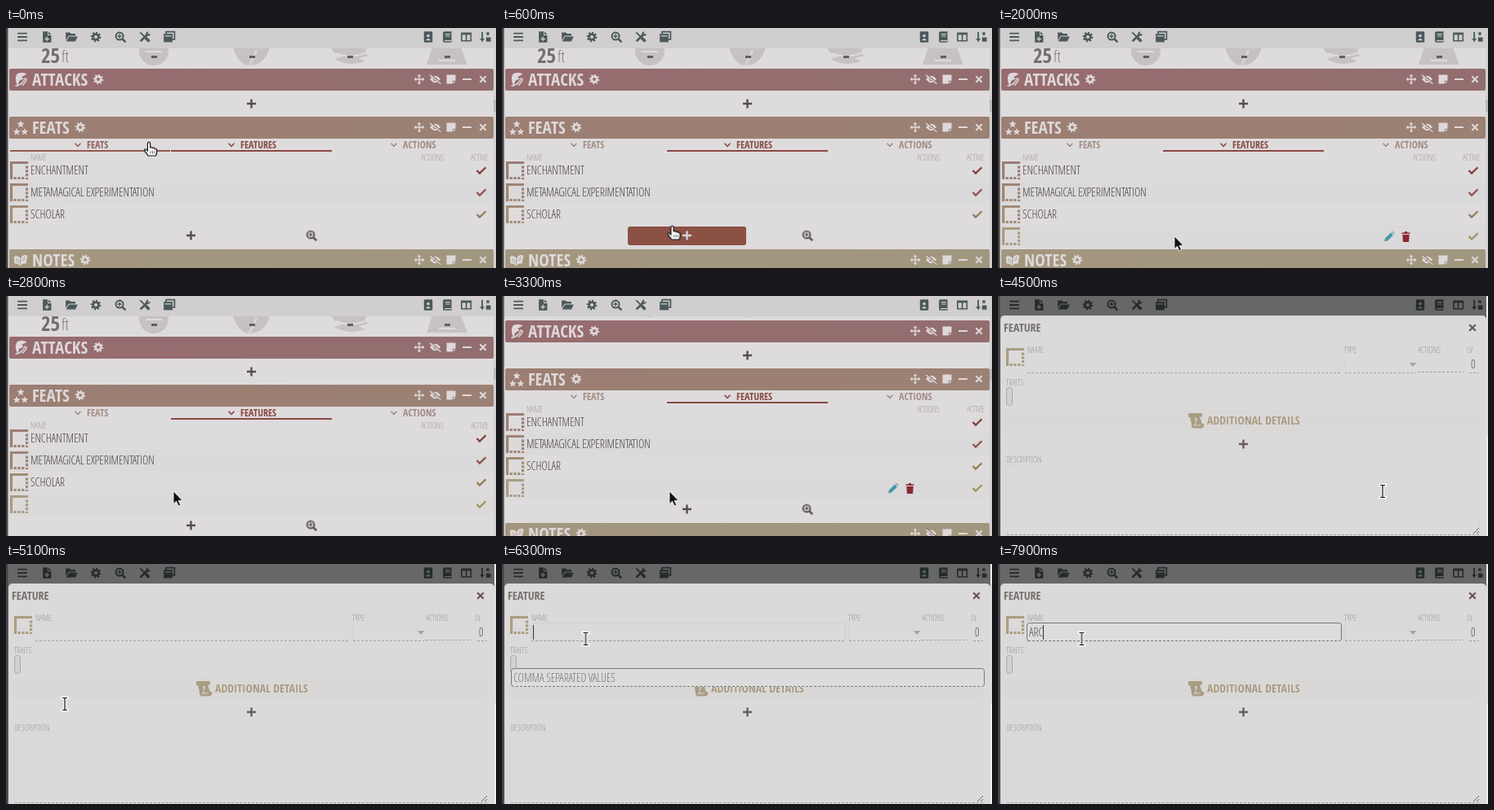
Write an HTML page that moves like this. It is 600x295 px and loops after 8000 ms.

```html
<!DOCTYPE html>
<html lang="en">
<head>
<meta charset="utf-8">
<title>Character sheet</title>
<style>
html, body { margin: 0; width: 100%; height: 100%; overflow: hidden; background: #dedbdd; }
svg { display: block; width: 600px; height: 295px; }
text { font-family: 'Open Sans Condensed Light', 'Open Sans', sans-serif; font-weight: 300; white-space: pre; }
text.b { font-family: 'Open Sans Condensed', 'Open Sans', sans-serif; font-stretch: condensed; font-weight: 700; }
text.wide { font-family: 'Open Sans', sans-serif; font-stretch: normal; }
.line { fill: none; stroke: currentColor; }
.dash { stroke: #a3a0a1; stroke-dasharray: 3 2; }
</style>
</head>
<body>
<svg id="stage" viewBox="0 0 600 295" xmlns="http://www.w3.org/2000/svg"></svg>
<script>
const LOOP = 8000;
const stage = document.getElementById('stage');

// Use a condensed face where there is one, otherwise narrow the regular one.
function narrowing(bold) {
  const width = cls => {
    stage.innerHTML = `<text class="${cls}" font-size="40">ADDITIONAL FEATURES</text>`;
    return stage.firstChild.getComputedTextLength();
  };
  return width(bold) / width(bold + ' wide') < 0.86 ? 1 : 0.71;
}
const narrow = { '': narrowing(''), b: narrowing('b') };

const text = (x, y, str, size, color, cls = '', id = '') =>
  `<g id="${id}"><text class="${cls}" transform="translate(${x} ${y}) scale(${narrow[cls]} 1)" font-size="${size}" fill="${color}">${str}</text></g>`;
const rect = (x, y, w, h, fill, r = 0, more = '') =>
  `<rect x="${x}" y="${y}" width="${w}" height="${h}" rx="${r}" fill="${fill}" ${more}/>`;
const path = (d, width = 0) => width
  ? `<path class="line" stroke-width="${width}" d="${d}"/>`
  : `<path fill="currentColor" d="${d}"/>`;
const group = (id, body) => `<g id="${id}">${body}</g>`;
const icon = (name, x, y, color, scale = 1) =>
  `<g transform="translate(${x} ${y}) scale(${scale})" color="${color}">${icons[name]}</g>`;

function star(cx, cy, r) {
  let d = '';
  for (let i = 0; i < 10; i++) {
    const a = i * Math.PI / 5 - Math.PI / 2, q = i % 2 ? r * 0.45 : r;
    d += `${i ? 'L' : 'M'}${(cx + q * Math.cos(a)).toFixed(2)} ${(cy + q * Math.sin(a)).toFixed(2)}`;
  }
  return path(d + 'z');
}

const INK = '#574b4e', PALE = '#ded8da', PANEL = '#dbdadb';

const icons = {
  bars: path('M-6-4.5H6M-6 0H6M-6 4.5H6', 1.8),
  file: path('M-5-7H1V-2H5.5V7H-5zM2-7L5.5-3H2z') + '<path d="M-2.5 2.5H3M.2-.2V5.2" stroke="#d0cece" stroke-width="1.4"/>',
  folder: path('M-7 4V-5.5H-2L-.5-4H5V-1.5H-3.5z M-3-.5H8L5 5.5H-6.5z'),
  cog: '<circle class="line" r="3.5" stroke-width="2.8"/><circle class="line" r="5.5" stroke-width="2" pathLength="16" stroke-dasharray="1 1"/>',
  zoom: '<circle class="line" cx="-1" cy="-1" r="4.6" stroke-width="2"/>' + path('M2.5 2.5L6.5 6.5', 2.6) + path('M-3.5-1H1.5M-1-3.5V1.5', 1.4),
  tools: path('M-5-5L1 1', 1.8) + path('M1 1L5.5 5.500', 3.6) + path('M-5.500 5.500L2.500-2.500', 2.8) + path('M6.500-3.500L3.500-2.200 2.200-3.500 3.500-6.500', 2) + path('M-7-6.500L-3.500-5-5-3.500z'),
  windows: path('M-4-4V-6.5H6.5V3H4', 1.8) + path('M-7-4H4V6.5H-7z') + '<path d="M-5.5-1.2H2.5" stroke="#d0cece" stroke-width="1.2"/>',
  contact: path('M-4-7H4Q5.500-7 5.500-5.500V5.500Q5.500 7 4 7H-4Q-5.500 7-5.500 5.500V-5.500Q-5.500-7-4-7z') + '<circle cy="-1.500" r="1.900" fill="#d0cece"/><path d="M-3.200 4.500Q0-.5 3.200 4.500z" fill="#d0cece"/>',
  book: path('M-3.5-7H5.5V7H-3.5Q-5.5 7-5.5 5V-5Q-5.5-7-3.5-7z') + '<path d="M-2.5-3.5H3.5M-2.5-1H3.5M-3.5 4.8H5" stroke="#d0cece" stroke-width="1.2"/>',
  columns: path('M-6-5H6V5H-6zM0-5V5', 1.7) + path('M-6-4H6', 2.4),
  sort: path('M-4-6.500V3', 2) + path('M-7 2H-1L-4 6.500zM1.500-6H5V-2.500H1.500zM1 .5H7V6H1z'),
  move: path('M-5.5 0H5.5M0-5.5V5.5', 1.5) + path('M0-7L2.6-4H-2.6zM0 7L2.6 4H-2.6zM-7 0L-4-2.6V2.6zM7 0L4-2.6V2.6z'),
  hidden: path('M-7 0Q0-9 7 0Q0 9-7 0z') + '<circle r="2.4" fill="#8d7370"/><path d="M-7-6.3L7 5.3" stroke="#8d7370" stroke-width="3"/>' + path('M-7-5.5L7.5 6', 1.6),
  note: path('M-6-6H6V2H2V6H-6zM3 3H6L3 6z'),
  minus: path('M-6 0H6', 2.2),
  close: path('M-4-4L4 4M4-4L-4 4', 2.3),
  plus: path('M-5.5 0H5.5M0-5.5V5.5', 2.4),
  check: path('M-5.5 0L-2 3.6 5.5-3.8', 2.3),
  chevron: path('M-3.5-1.7L0 1.8 3.5-1.7', 1.6),
  pencil: path('M-6 6L-5 2 2-5 5-2-2 5zM3-6L4-6.5 6.5-4 6-3z'),
  trash: path('M-5-5H-2L-1-6.5H1L2-5H5V-3.4H-5zM-4.2-2.5H4.2L3.6 6.5H-3.6z'),
  frame: path('M-9.5 11V-9.5H11', 3.2) + '<path class="line" stroke-width="3.2" stroke-dasharray="3.2 1.6" d="M9.5-5.500V11M6.300 9.500H-9"/>',
  attacks: path('M-5-8Q1-12 8-8L1-4 4-2-2 1-4 8Q-9-1-5-8z') + path('M-7 8Q3 6 6-3M2 7Q7 3 8-2', 1.6),
  feats: star(0, -5, 5.3) + star(-5.2, 5, 5) + star(5.2, 5, 5),
  notes: path('M-9-5Q-4-8 0-3Q3-9 9-7L7 4Q2 3-1 7Q-4 3-8 4z') + '<path d="M0-3L-1 6M-6-3L-2 0M-6 0L-2 3M3-3L6-5M2 0L6-2" stroke="#a3977f" stroke-width="1"/>',
  scroll: path('M-10-9H5Q8-9 7-5L4-4 7 4H9Q10 9 6 9.500H-3Q-7 9-6 4L-8-4H-10z') + `<text class="b" x="-3" y="4.500" font-size="11" fill="${PANEL}">?</text><path d="M-4 6H5" stroke="${PANEL}"/>`,
};

function bar(y, title, color, end, name) {
  const gear = { attacks: 113, feats: 91, notes: 97 }[name];
  const tools = ['move', 'hidden', 'note', 'minus', 'close'];
  return `<linearGradient id="g-${name}"><stop stop-color="${color}"/><stop offset="1" stop-color="${end}"/></linearGradient>` +
    rect(4, y, 593, 27, `url(#g-${name})`, 2) +
    icon(name, 18, y + 14, PALE, 0.93) + text(32, y + 21, title, 21, PALE, 'b') +
    icon('cog', gear, y + 13, PALE, 0.95) +
    tools.map((t, i) => icon(t, 506 + i * 19.5, y + 13, PALE, 0.92)).join('');
}

function row(i, label, frame, tick) {
  const y = 175 + i * 27;
  return (i % 2 ? rect(4, y - 13, 593, 27, '#dbd9da') : '') +
    icon('frame', 16, y, frame) + text(30, y + 4.5, label, 14, '#454043') +
    icon('check', 582, y, tick);
}

const tab = (x, label, color, id) =>
  group(id, icon('chevron', x - 11, 143.5, color) + text(x, 148, label, 12, color, 'b'));

const stats =
  text(43, 43, '25', 25, '#756c70', 'b') + text(68, 42, 'ft', 20, '#7d767a') +
  '<g fill="#c5c1c4"><circle cx="181" cy="28" r="18"/><path d="M278 24Q285 47 300 46Q318 44 323 24zM398 24H443Q436 30 444 34L432 37 440 41Q420 48 402 38L414 34Q400 32 398 24zM522 24H557L565 45H515z"/></g>' +
  '<path d="M171 29H191M307 27L298 46M404 31Q420 38 440 31M530 40H550" stroke="#dedbdd" stroke-width="2" fill="none"/>' +
  [181, 301, 421, 540].map(x => rect(x - 3, 34, 7, 3, '#655c60')).join('');

const sheet =
  stats +
  bar(50, 'ATTACKS', '#976c6f', '#936e6f', 'attacks') + icon('plus', 300.5, 93, INK) +
  bar(109, 'FEATS', '#9c7e73', '#9b8174', 'feats') +
  tab(99, 'FEATS', '#a38c84', 'tab') + tab(99, 'FEATS', '#8f6057', 'tabOn') +
  tab(287, 'FEATURES', '#87483f') + tab(486, 'ACTIONS', '#a18a82') +
  rect(202, 150, 197, 2, '#8a4a42') + group('line', rect(5, 150, 196, 2, '#95594f')) +
  text(30, 163, 'NAME', 10, '#a29d9e') + text(508, 163, 'ACTIONS', 10, '#a29d9e') + text(569, 163, 'ACTIVE', 10, '#a29d9e') +
  row(0, 'ENCHANTMENT', '#9c7e73', '#813f38') +
  row(1, 'METAMAGICAL EXPERIMENTATION', '#a08473', '#8c5547') +
  row(2, 'SCHOLAR', '#a28d76', '#977a52') +
  group('fresh', row(3, '', '#a89d82', '#a09466') +
    group('edit', icon('pencil', 479, 256.5, '#4797aa') + icon('trash', 499.5, 256.5, '#8a2a30'))) +
  group('adders',
    group('button', rect(154, 244, 145, 23, '#8c5145', 3)) +
    icon('plus', 226.5, 255, INK) + group('plusOn', icon('plus', 226.5, 255, '#ddd3d2')) +
    icon('zoom', 374, 255, INK, 0.95)) +
  group('notes', bar(272, 'NOTES', '#a3967e', '#a0977f', 'notes'));

const topIcons = ['bars', 'file', 'folder', 'cog', 'zoom', 'tools', 'windows'];
const sideIcons = ['contact', 'book', 'columns', 'sort'];
const toolbar = rect(0, 0, 600, 25, '#d0cece') +
  topIcons.map((n, i) => icon(n, 20 + i * 30, 11, '#4b595b', 0.98)).join('') +
  sideIcons.map((n, i) => icon(n, 517 + i * 23.3, 11, '#4b595b', 0.95)).join('');

const LABEL = '#999595', TAN = '#aa9c82';
const label = (x, y, s) => text(x, y, s, 10, LABEL);
const dashes = (x, w, y) => `<path class="dash" d="M${x} ${y}h${w}"/>`;

const dialog =
  rect(0, 0, 598, 295, '#000', 0, 'opacity=".5"') +
  rect(598, 0, 2, 295, '#f1f0f1') + rect(598, 24, 2, 147, '#e0dfe0') +
  rect(3, 24, 595, 290, PANEL, 5) +
  text(7, 44, 'FEATURE', 14, '#78716f', 'b') + icon('close', 581, 39, '#6b5356', 0.95) +
  icon('frame', 21, 75, '#aa9d80') +
  label(36, 69.5, 'NAME') + label(424, 69.5, 'TYPE') + label(514, 69.5, 'ACTIONS') + label(574, 69.5, 'LV') +
  dashes(36, 384, 94.5) + dashes(425, 87, 94.5) + dashes(514, 56, 93.5) + dashes(577, 12, 94.5) +
  '<path d="M503.500 82h9l-4.500 5z" fill="#a9a4a4"/>' + text(579, 89, '0', 14, '#555051') +
  '<path d="M420.500 74V94M424.500 74V94M10.500 207V293M589.500 207V293M10 207.500H590" stroke="#d6d5d6"/>' +
  label(10, 110, 'TRAITS') + rect(10.5, 112.5, 7, 22, '#d2d0d0', 3, 'stroke="#aba7a7"') +
  rect(10, 140, 580, 26, '#dad8d7') +
  icon('scroll', 243, 153, TAN) + text(256, 158, 'ADDITIONAL DETAILS', 14, TAN, 'b') +
  icon('plus', 300.5, 182, '#6a5c5f') +
  label(10, 205, 'DESCRIPTION') + dashes(11, 579, 293.5) +
  '<path d="M582 292L589 285M586 292L589 289" stroke="#666"/>' +
  group('focus', rect(35.5, 72.5, 385, 22, '#dddcdd', 3, 'stroke="#787475"') + `<path stroke="${PANEL}" stroke-dasharray="2 3" d="M40 94.500H417"/>`) +
  ['A', 'AR', 'ARC'].map(s => text(38, 89, s, 14, '#555051', '', 'typed' + s.length)).join('') +
  group('caret', rect(38, 75, 1, 18, '#333')) +
  group('hint', rect(11.5, 128.5, 579, 22, '#dddcdd', 3, 'stroke="#7d797a"') +
    '<path stroke="#dddcdd" stroke-dasharray="2 3" d="M15 150.500H588"/>' +
    text(14, 145, 'COMMA SEPARATED VALUES', 14, '#777273'));

const beam = 'M-3-7.500H-1Q0-7.500 0-6.500Q0-7.500 1-7.500H3M0-6.500V6.500M-3 7.500H-1Q0 7.500 0 6.500Q0 7.500 1 7.500H3';
const pointer = group('pointer',
  group('hand', '<path d="M-1.600 1.500a1.600 1.600 0 0 1 3.200 0V6.500q2-.8 3 .7 2-.7 2.800.9 2.200-.2 2.300 1.500V12q0 2.500-1.500 4.500H-1q-1-2-4-5.500-1.200-2 .4-2.400 1.400-.2 3 1.800z" fill="#fff" stroke="#111" stroke-width="1.200"/><path d="M2 10.500v3.500M4.500 10.500v3.500M7 10.500v3.500" stroke="#333" stroke-width=".8"/>') +
  group('arrow', '<path d="M0 0V15.500L3.600 12.200 6 18 8.600 17 6.200 11.400H11z" fill="#111" stroke="#eee" stroke-width=".9"/>') +
  group('beam', `<path d="${beam}" fill="none" stroke="#fff" stroke-width="3.400" stroke-linecap="square"/><path d="${beam}" fill="none" stroke="#111" stroke-width="1.200"/>`));

stage.innerHTML = rect(0, 0, 600, 295, '#dedbdd') + rect(597, 25, 3, 270, '#d3d1d2') +
  group('thumb', rect(597, 88, 3, 15, '#bcbabb', 1)) +
  group('sheet', sheet) + toolbar + group('dialog', dialog) +
  rect(0, 0, 2.5, 295, '#484648') + pointer;

// Stepped keyframes from [ms, value] pairs.
let css = '';
function steps(id, prop, list) {
  const frames = [...list, [LOOP, list[list.length - 1][1]]]
    .map(([t, v]) => `${t / LOOP * 100}% { ${prop}: ${v}; }`).join(' ');
  css += `@keyframes ${id} { ${frames} }\n#${id} { animation: ${id} ${LOOP}ms step-end infinite; }\n`;
}
const fade = (id, ...list) => steps(id, 'opacity', list);
const slide = (id, ...list) => steps(id, 'transform', list.map(([t, x, y]) => [t, `translate(${x}px, ${y}px)`]));

fade('tab', [0, 0], [300, 1]);
fade('tabOn', [0, 1], [300, 0]);
fade('line', [0, 1], [300, 0]);
fade('button', [0, 0], [500, .6], [600, 1], [1900, 0]);
fade('plusOn', [0, 0], [500, 1], [1900, 0]);
fade('fresh', [0, 0], [1900, 1]);
fade('edit', [0, 1], [2800, 0], [3300, 1]);
fade('dialog', [0, 0], [4500, 1]);
fade('hint', [0, 0], [5400, .6], [5500, 1], [6400, .5], [6500, 0]);
fade('focus', [0, 0], [6300, .12], [6400, .6], [6500, 1]);
fade('typed1', [0, 0], [6800, 1], [7600, 0]);
fade('typed2', [0, 0], [7600, 1], [7900, 0]);
fade('typed3', [0, 0], [7900, 1]);
fade('hand', [0, 1], [1900, 0], [4100, 1], [4500, 0]);
fade('arrow', [0, 0], [1900, 1], [4100, 0]);
fade('beam', [0, 0], [4500, 1]);
slide('sheet', [0, 0, 0], [3000, 0, -10], [3300, 0, -20]);
slide('thumb', [0, 0, 0], [3000, 0, 1]);
slide('adders', [0, 0, 0], [1900, 0, 27]);
slide('notes', [0, 0, 0], [2400, 0, 27]);
slide('caret', [0, -99, 0], [6200, 0, 0], [6800, 6, 0], [7300, -99, 0], [7600, 12, 0], [7900, 17, 0]);
slide('pointer', [0, 175, 140.5], [300, 190, 179], [500, 203, 222], [600, 208.5, 243.5], [800, 218, 257],
  [1900, 216, 256], [2600, 212, 251], [2700, 207, 244], [2800, 205, 240], [3400, 345, 229],
  [3600, 395, 236], [3700, 436, 239], [3800, 462, 240], [3900, 473, 240], [4100, 475.5, 240],
  [4500, 471, 240], [4600, 400, 232], [4700, 300, 218], [4800, 205, 203], [4900, 130, 190], [5000, 88, 179],
  [5100, 72, 172], [5400, 70, 150], [6000, 82, 124], [6100, 96, 102], [6200, 102.5, 92]);

document.head.appendChild(document.createElement('style')).textContent = css;
</script>
</body>
</html>
```
